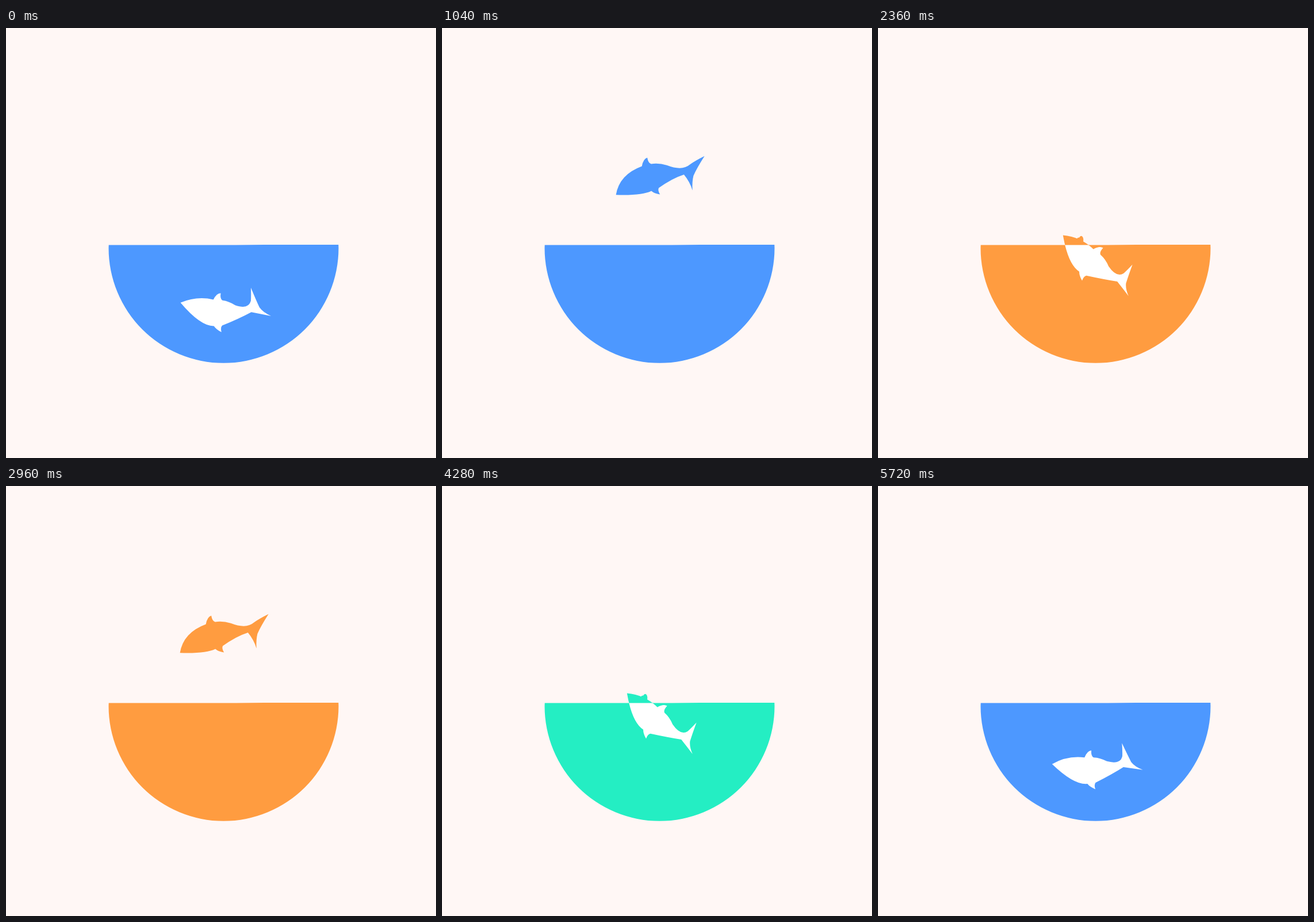
Animation, 748 px wide and 748 px high, one loop 5.76 s. Source, as an HTML page with a canvas:

```html
<!DOCTYPE html>
<html lang="en">
<head>
<meta charset="utf-8">
<title>Jumping fish</title>
<style>
html, body { margin: 0; width: 100%; height: 100%; overflow: hidden; background: #fff7f5; }
canvas { display: block; width: 748px; height: 748px; }
</style>
</head>
<body>
<canvas id="stage" width="748" height="748"></canvas>
<script>
const ctx = document.getElementById('stage').getContext('2d');
const CYCLE = 1920, SWITCH = 1300;
const COLORS = ['#4d98ff', '#ff9c40', '#24eec3'];
const PAPER = '#fff7f5';

// Straight fish facing left: nose, then quadratic segments (control, end).
const FISH = [
  [-68.2, 0],
  [-47, -23, -12, -22.8], [-7, -34.5, 0.3, -35], [-0.5, -25, 4.2, -22.8],  // back and fin
  [16.5, -22, 28.5, -15], [52, -4, 61, -16],
  [66, -23, 73.5, -32], [70.5, -12, 70, -1], [71, 7.5, 77.5, 17.5],        // tail
  [68, 9, 55.5, 1], [34.5, 8.5, 7, 21],
  [4, 25, 6.5, 32.5], [-3, 28.5, -7, 23], [-28, 26, -68.2, 0]              // lower fin, belly
];
const HALF = 70, ARCH = 15;

// Angle of the cycle, in radians, counted from a given moment.
const phase = (t, from) => 2 * Math.PI * (t - from) / CYCLE;

const tilt = t => 38 * Math.sin(phase(t, -35));
const bend = t => 1.1 * Math.cos(phase(t, 160));
const fishX = t => 371 + 5 * Math.sin(phase(t, -40));
const fishY = t => 375.7 + 107 * Math.tanh(2.4 * (0.17 - Math.cos(phase(t, 900))));

// Lays a point on the arched spine, offset along the spine's normal.
function arch(x, y, amount) {
  const u = x / HALF, a = Math.abs(u);
  const slope = -3 * ARCH * amount * u * a / HALF;
  return [x - y * slope, y + ARCH * amount * (1 - a * a * a)];
}

function fishPath(t) {
  const outline = new Path2D(), fish = new Path2D(), amount = bend(t);
  const [nose, ...segments] = FISH;
  outline.moveTo(...arch(...nose, amount));
  for (const [cx, cy, x, y] of segments) {
    outline.quadraticCurveTo(...arch(cx, cy, amount), ...arch(x, y, amount));
  }
  outline.closePath();
  fish.addPath(outline, new DOMMatrix().translate(fishX(t), fishY(t)).rotate(tilt(t)));
  return fish;
}

const bowl = new Path2D();
bowl.moveTo(178.7, 377.5);
bowl.lineTo(400, 377.5);
bowl.lineTo(450, 376.9);
bowl.lineTo(578.3, 376.9);
bowl.arc(378.5, 382.8, 200, 0, Math.PI);
bowl.closePath();

// Drops: sideways speed and launch speed in px per ms.
const DROPS = [[0.58, 1.412], [0.38, 1.16], [0.16, 0.9], [-0.19, 0.95]];
const GRAVITY = 0.00772;

function splash(age) {
  for (const [vx, vy] of DROPS) {
    const life = 2 * vy / GRAVITY;
    if (age < 0 || age > life) continue;
    const r = 0.9 + 3 * (1 - age / life);
    const x = 350 + vx * age, y = 377 - vy * age + GRAVITY * age * age / 2;
    ctx.beginPath();
    ctx.ellipse(x, y, r, r * 1.8, 0, 0, 2 * Math.PI);
    ctx.fill();
  }
}

function draw(now) {
  const time = now % (CYCLE * COLORS.length), t = time % CYCLE;
  const turn = Math.floor(time / CYCLE) + (t >= SWITCH ? 1 : 0);
  const fish = fishPath(t);
  ctx.fillStyle = PAPER;
  ctx.fillRect(0, 0, 748, 748);
  ctx.fillStyle = COLORS[turn % COLORS.length];
  ctx.fill(fish);
  splash(t - 434);
  splash(t - 1286);
  ctx.fill(bowl);
  // The submerged part of the fish is white.
  ctx.save();
  ctx.clip(bowl);
  ctx.fillStyle = '#fff';
  ctx.fill(fish);
  ctx.restore();
}

let start = null;
function tick(now) {
  if (start === null) start = now;
  draw(now - start);
  requestAnimationFrame(tick);
}
draw(0);
requestAnimationFrame(tick);
</script>
</body>
</html>
```
